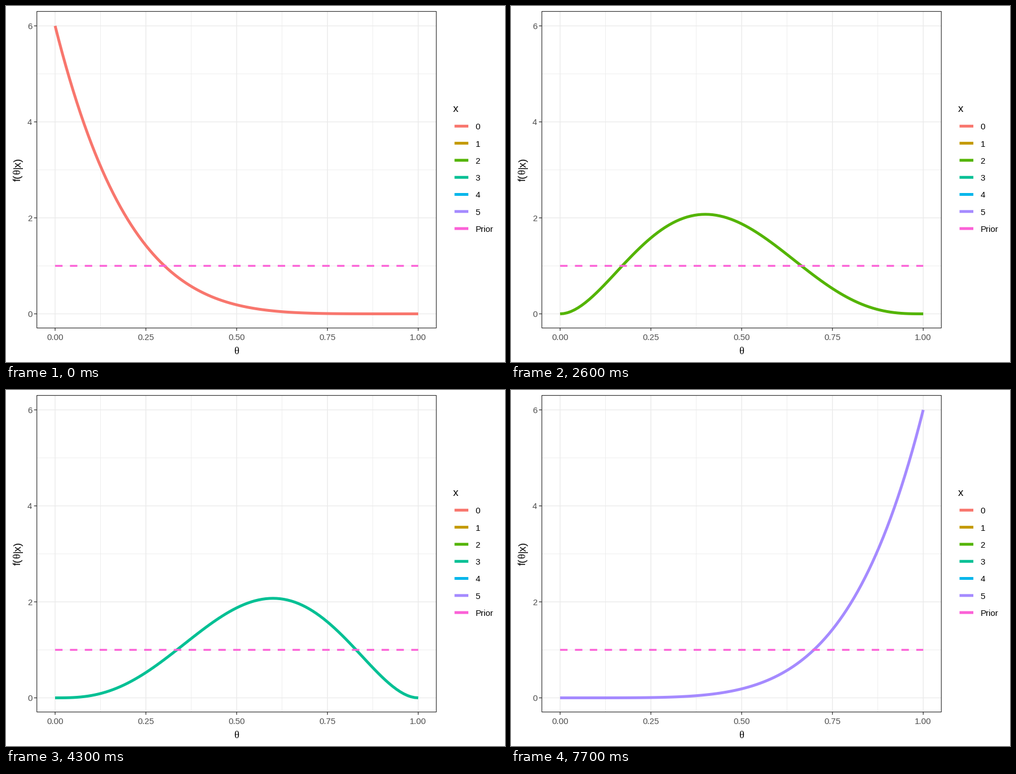
Animation, 885 px wide and 632 px high, one loop 9.3 s. Source, as a matplotlib script:

```python
import math

import matplotlib.pyplot as plt
import numpy as np
from matplotlib.animation import FuncAnimation

W, H, DPI = 885, 632, 100
PX = 72 / DPI  # points per pixel
COLORS = ["#F8766D", "#C49A00", "#53B400", "#00C094", "#00B6EB", "#A58AFF", "#FB61D7"]
LABELS = ["0", "1", "2", "3", "4", "5", "Prior"]
LEFT, RIGHT, TOP, BOTTOM = 54.7, 763.2, 9.6, 571.6

INTERVAL = 100
FRAMES = 93
STARTS = [0, 9, 26, 43, 60, 77]
TRIALS = 5

fig = plt.figure(figsize=(W / DPI, H / DPI), dpi=DPI, facecolor="white")
ax = fig.add_axes([0, 0, 1, 1])
ax.set(xlim=(0, W), ylim=(H, 0))
ax.axis("off")


def px_x(theta):
    return 87.1 + 644 * theta


def px_y(density):
    return 546.5 - 85.2 * density


def line(xs, ys, color, width, **kw):
    kw.setdefault("solid_capstyle", "butt")
    return ax.plot(xs, ys, color=color, lw=width * PX, snap=False, **kw)[0]


def text(x, y, s, size=15, color="black", font="Liberation Sans", **kw):
    return ax.text(x, y, s, fontsize=size * PX, color=color, family=font,
                   va="baseline", **kw)


def grid(x_values, y_values, width):
    for v in y_values:
        line([LEFT, RIGHT], [px_y(v)] * 2, "#EBEBEB", width, zorder=1)
    for v in x_values:
        line([px_x(v)] * 2, [TOP, BOTTOM], "#EBEBEB", width, zorder=1)


def posterior(x):
    """Beta(x + 1, 6 - x) density curve in pixels."""
    theta = np.linspace(0, 1, 101)
    density = (TRIALS + 1) * math.comb(TRIALS, x) * theta**x * (1 - theta)**(TRIALS - x)
    return px_x(theta), px_y(density)


# Panel
x_ticks, y_ticks = [0, 0.25, 0.5, 0.75, 1], [0, 2, 4, 6]
grid([0.125, 0.375, 0.625, 0.875], [1, 3, 5], 0.8)
grid(x_ticks, y_ticks, 1.4)
line([LEFT, RIGHT, RIGHT, LEFT, LEFT], [TOP, TOP, BOTTOM, BOTTOM, TOP],
     "#333333", 1.2, zorder=5, solid_joinstyle="miter")

for v in x_ticks:
    line([px_x(v)] * 2, [BOTTOM, BOTTOM + 5], "#333333", 1.3)
    text(px_x(v), 592.7, f"{v:.2f}", color="#4D4D4D", ha="center")
for v in y_ticks:
    line([LEFT - 5, LEFT], [px_y(v)] * 2, "#333333", 1.3)
    text(46.5, px_y(v) + 5.7, str(v), color="#4D4D4D", ha="right")

# Axis titles
text(408.8, 618, "θ", 18.6, font="Liberation Serif", ha="center")
for y, s, font in [(310.8, "f(", "Sans"), (299, "θ", "Serif"), (288.8, "|x)", "Sans")]:
    text(25.5, y, s, 18.6, font=f"Liberation {font}", rotation=90,
         rotation_mode="anchor", ha="left")

# Legend
text(792.5, 188, "x", 18.6)
for i, (label, color) in enumerate(zip(LABELS, COLORS)):
    y = 213.3 + 30.3 * i
    line([795.5, 820], [y, y], color, 5)
    text(832.6, y + 6, label)

curve = line([], [], COLORS[0], 5, zorder=3, solid_joinstyle="round")
line([px_x(0), px_x(1)], [px_y(1)] * 2, COLORS[-1], 3.29, zorder=4,
     linestyle=(0, (4, 4)), dash_capstyle="butt")


def update(frame):
    x = sum(frame >= start for start in STARTS) - 1
    curve.set_data(*posterior(x))
    curve.set_color(COLORS[x])
    return [curve]


anim = FuncAnimation(fig, update, frames=FRAMES, interval=INTERVAL,
                     repeat=True, repeat_delay=0)
plt.show()
```
